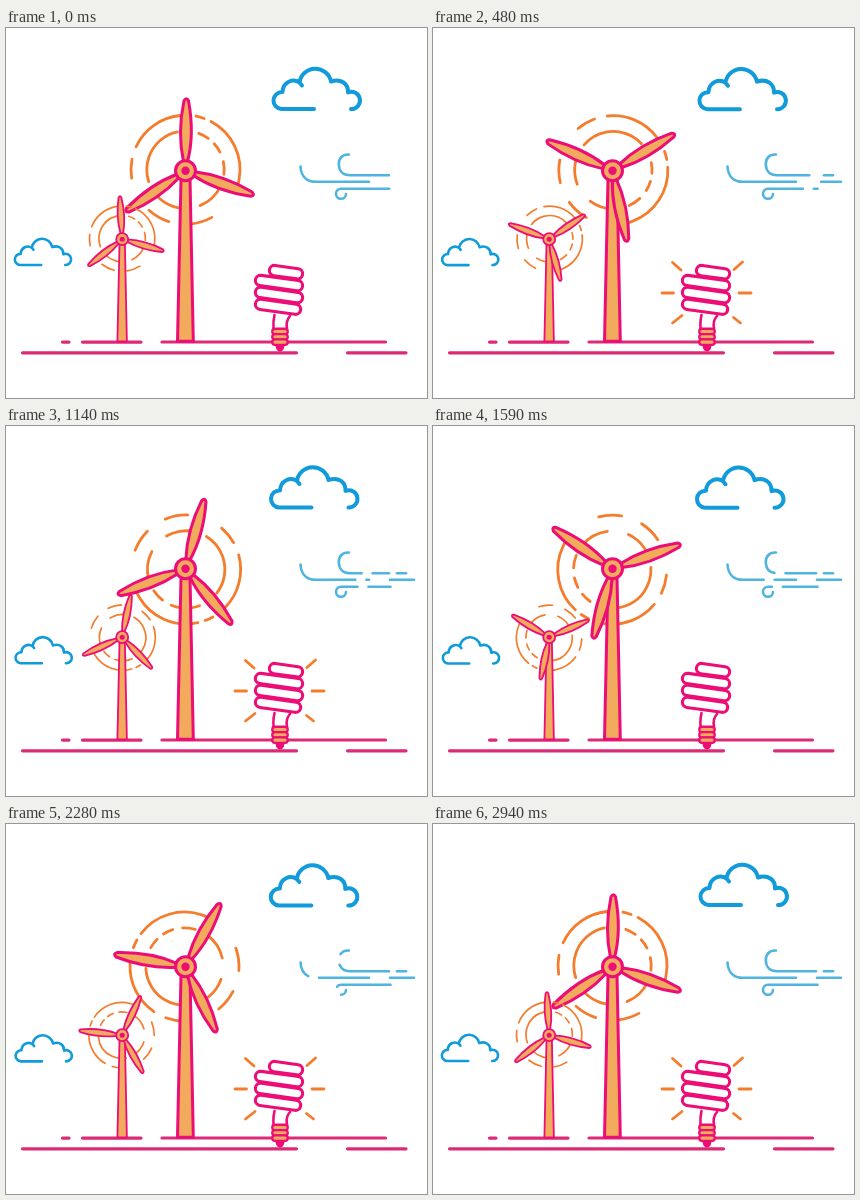
Animation of 421x370 px, one loop 2.97 s. Source, as an HTML page:

```html
<!DOCTYPE html>
<html lang="en">
<head>
<meta charset="utf-8">
<title>Wind energy</title>
<style>
html, body { margin: 0; width: 100%; height: 100%; overflow: hidden; background: #fff; }
svg { display: block; width: 421px; height: 370px; }
path, line, circle { stroke-linecap: round; stroke-linejoin: round; }
.ring { fill: none; stroke: #f47c2c; stroke-width: 2.8; }
.solid { fill: #f2ab5c; stroke: #ec0d77; stroke-width: 3; }
.cloud { fill: none; stroke: #129bdb; stroke-width: 4; }
.wind { fill: none; stroke: #4fb4e0; stroke-width: 2.6; }
.ground { fill: none; stroke: #dc2a76; stroke-width: 3.2; }
.neck { fill: none; stroke: #ec0d77; stroke-width: 2.6; }
.rays { fill: none; stroke: #f47c2c; stroke-width: 2.8; }
</style>
</head>
<body>
<svg viewBox="0 0 421 370">
  <defs>
    <path id="cloud" class="cloud" d="M308 81H275.5a8.5 8.5 0 0 1 1-17C277 54 287 50 293.5 54.5L296 57.5M293.5 54.5A16 16 0 0 1 325 53.5C335 50 342.5 56 342 64.5A8.6 8.6 0 1 1 345 81"/>
  </defs>
  <g id="bigCloud"><use href="#cloud"/></g>
  <g id="smallCloud"><use href="#cloud" transform="translate(-165 184.3) scale(.65)"/></g>
  <g id="wind"></g>
  <path class="ground" d="M56.5 314.1H63M76.5 314.1H135M156 314H379.5M16.5 324.8H290.5M341.5 324.8H400"/>
  <g id="turbines"></g>
  <path class="neck" d="M268.5 287Q267 293 267.5 301M284 288Q279.5 293 281 301"/>
  <path d="M270.500 318H277.500Q277 322.500 274 322.500T270.500 318Z" fill="#ec0d77" stroke="#ec0d77" stroke-width="2"/>
  <g id="bulb"></g>
  <path id="rays" class="rays" d="M229 265H240.5M306 265H318M239.5 234.5L248 242M309.5 234L301 241.5M239.5 295L249 287.5M307.5 295L300.5 289.5"/>
</svg>
<script>
const FRAME = 30, COUNT = 99, TURN = FRAME * (COUNT - 1);
const $ = id => document.getElementById(id);

function add(parent, tag, attrs) {
  const el = document.createElementNS('http://www.w3.org/2000/svg', tag);
  for (const k in attrs) el.setAttribute(k, attrs[k]);
  return parent.appendChild(el);
}

// Dashes are in degrees, clockwise from the given start.
function ring(parent, r, start, dashes) {
  add(parent, 'circle', {
    class: 'ring', r, cy: -1, pathLength: 360, 'stroke-dasharray': dashes,
    transform: `rotate(${start - 90} 0 -1)`
  });
}

const BLADE = 'M-2-9C-7-32-5.5-51-1.5-70Q1-74 3-70C6.5-51 8-32 2-9Z';

function turbine(x, y, scale, tilt) {
  const g = add($('turbines'), 'g', { transform: `translate(${x} ${y}) scale(${scale})` });
  const rings = add(g, 'g', {});
  ring(rings, 54.5, 11, '9 8 76 47 24 23 24 39 20 14 59 17');
  ring(rings, 38.7, 20, '16 12 15 15 19 18 43 32 38 24 96 32');
  add(g, 'path', { class: 'solid', d: 'M-4.5 8L-8 170.5H7.8L4.5 8Z' });
  const rotor = add(g, 'g', {});
  for (const a of [0, 109, 235]) add(rotor, 'path', { class: 'solid', d: BLADE, transform: `rotate(${a})` });
  add(g, 'circle', { class: 'solid', r: 10 });
  add(g, 'circle', { r: 4.2, fill: '#ec0d77' });
  return deg => [rings, rotor].forEach(el => el.setAttribute('transform', `rotate(${deg + tilt})`));
}

const spins = [turbine(179.5, 142.7, 1, 0), turbine(116.2, 211.2, .6, -3.7)];

// A rounded tube: a pink line with a narrower line on top.
function tube(x1, x2, y, slope, width, border, fill) {
  const mid = 273, ends = { x1, x2, y1: y + slope * (x1 - mid), y2: y + slope * (x2 - mid) };
  add($('bulb'), 'line', { ...ends, stroke: '#ec0d77', 'stroke-width': width });
  add($('bulb'), 'line', { ...ends, stroke: fill, 'stroke-width': width - 2 * border });
}

for (let i = 0; i < 4; i++)
  tube(i ? 254.5 : 268.5, i < 3 ? 291.5 : 289.5, 243.2 + 11.9 * i, .14, 13.4, 3.1, '#fff');
for (let i = 0; i < 3; i++) tube(269, 279, 303.5 + 5.3 * i, 0, 7.8, 2.3, '#f2ab5c');

// Each gust is erased from right to left while a new one follows it.
function gust(d, run, y, from, to) {
  const path = () => add($('wind'), 'path', { class: 'wind', d });
  const old = path(), fresh = path(), len = old.getTotalLength();
  const tail = to && add($('wind'), 'line', { class: 'wind', x2: to, y1: y, y2: y });
  const trim = (el, a, b) => {
    el.style.display = b > a ? '' : 'none';
    el.setAttribute('stroke-dasharray', `${Math.max(0, b - a)} 999`);
    el.setAttribute('stroke-dashoffset', -a);
  };
  return p => {
    const head = run * (1 - p);
    trim(old, 0, Math.min(len, head - 11));
    trim(fresh, head, len);
    if (!tail) return;
    tail.setAttribute('x1', Math.max(from, to - run * p));
    tail.style.display = p ? '' : 'none';
  };
}

const gusts = [
  gust('M294.5 138.5C295 147.5 300 153.8 310 153.8H363', 122, 153.8, 384, 408),
  gust('M343 126.5C336 126 332.5 131 332.8 136.5C333 143 337 147.2 344 147.2H383', 92, 147.2, 391, 400),
  gust('M340 166A5 5 0 1 1 335 160.8H384.5', 82)
];

function draw(t) {
  const p = t / TURN;
  spins.forEach(spin => spin(360 * p));
  gusts.forEach(blow => blow(p));
  const peak = .65, sway = p < peak ? p / peak : (1 - p) / (1 - peak);
  $('bigCloud').setAttribute('transform', `translate(${-4.2 * sway} ${.8 * sway})`);
  $('smallCloud').setAttribute('transform', `translate(${1.2 * sway} ${.6 * sway})`);
  $('rays').style.display = t % 1500 >= 300 ? '' : 'none';
}

const start = performance.now();
function tick() {
  draw(Math.floor((performance.now() - start) / FRAME) % COUNT * FRAME);
  requestAnimationFrame(tick);
}
draw(0);
requestAnimationFrame(tick);
</script>
</body>
</html>
```
